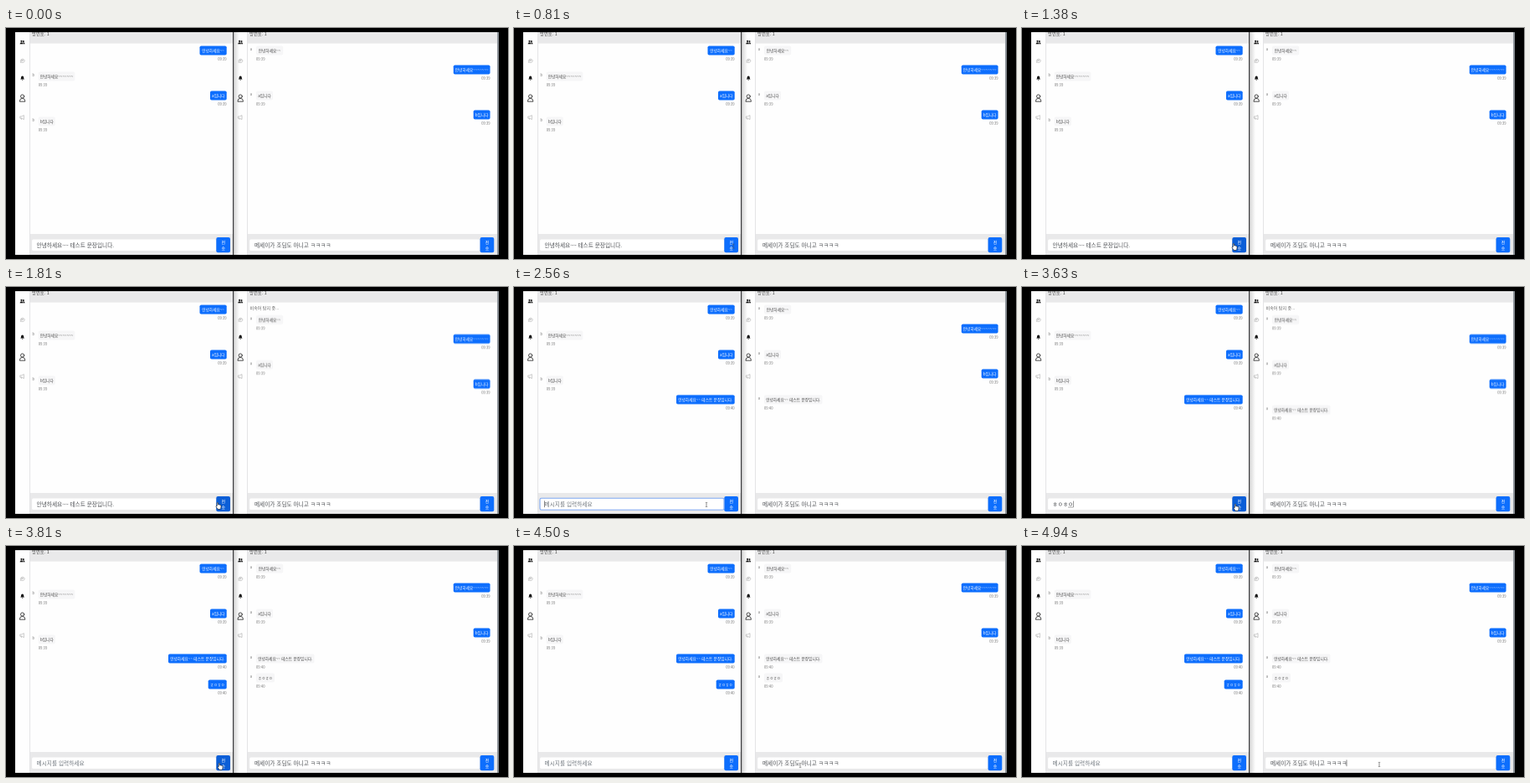
These frames come from a looping animation (600 by 277 pixels, 5000 ms). An HTML page:

```html
<!DOCTYPE html>
<html lang="ko">
<head>
<meta charset="utf-8">
<title>Chat</title>
<style>
html, body { margin: 0; width: 100%; height: 100%; overflow: hidden; background: #000; }
svg { display: block; width: 100vw; height: 100vh; font-family: "Noto Sans CJK KR", "Noto Sans CJK", "Noto Sans", sans-serif; }
.title { font-size: 5.3px; fill: #444; }
.msg { font-size: 4.7px; text-anchor: middle; fill: #444; }
.msg.mine { fill: #fff; }
.time { font-size: 4.2px; fill: #777; }
.name { font-size: 3.8px; fill: #666; }
.note { font-size: 5px; fill: #666; }
.field { font-size: 6.67px; fill: #4c4f53; }
.hint { fill: #70777e; }
.send { font-size: 5px; fill: #fff; text-anchor: middle; }

/* Hard on/off changes */
.draft, .hint, .typed, .focus, .caret, .checking, .shift, .first, .second,
.hover, .arrow, .beam, .hand, .rightCaret, .key { animation: 5s step-end infinite; }
.draft { animation-name: draft; }
.hint { animation-name: hint; }
.typed { animation-name: typed; }
.key { animation-name: key2; }
.key.k3 { animation-name: key3; }
.key.k4 { animation-name: key4; }
.focus { animation-name: focus; }
.caret { animation-name: caret; }
.checking { animation-name: checking; }
.shift { animation-name: shift; }
.first { animation-name: first; }
.second { animation-name: second; }
.hover { animation-name: hover; }
.arrow { animation-name: arrow; }
.beam { animation-name: beam; }
.hand { animation-name: hand; }
.rightCaret { animation-name: rightCaret; }
.pointer { animation: move 5s ease-in-out infinite; }

@keyframes draft { 0% { opacity: 1 } 41.2%, 100% { opacity: 0 } }
@keyframes hint { 0% { opacity: 0 } 41.2% { opacity: 1 } 56.2% { opacity: 0 } 75%, 100% { opacity: 1 } }
@keyframes typed { 0% { opacity: 0 } 56.2% { opacity: 1 } 75%, 100% { opacity: 0 } }
@keyframes key2 { 0% { opacity: 0 } 57.4%, 100% { opacity: 1 } }
@keyframes key3 { 0% { opacity: 0 } 58.8%, 100% { opacity: 1 } }
@keyframes key4 { 0% { opacity: 0 } 60%, 100% { opacity: 1 } }
@keyframes focus { 0% { opacity: 0 } 50% { opacity: 1 } 68.8%, 100% { opacity: 0 } }
@keyframes caret { 0% { opacity: 0 } 50% { opacity: 1 } 56.2%, 100% { opacity: 0 } }
@keyframes checking { 0% { opacity: 0 } 32.6% { opacity: 1 } 41.2% { opacity: 0 } 68.8% { opacity: 1 } 75%, 100% { opacity: 0 } }
@keyframes shift {
  0%, 41.2%, 75%, 100% { transform: none }
  32.6%, 68.8% { transform: translateY(12.3px) }
}
@keyframes first { 0% { opacity: 0 } 41.2%, 100% { opacity: 1 } }
@keyframes second { 0% { opacity: 0 } 75%, 100% { opacity: 1 } }
@keyframes hover { 0%, 44.6%, 86%, 100% { fill: #0d6efd } 16.8%, 64% { fill: #0b5ed7 } }
@keyframes arrow { 0% { opacity: 0 } 8.8% { opacity: 1 } 13.6%, 100% { opacity: 0 } }
@keyframes beam { 0%, 16.8%, 64% { opacity: 0 } 13.6%, 44.6%, 86%, 100% { opacity: 1 } }
@keyframes hand { 0%, 44.6%, 86%, 100% { opacity: 0 } 16.8%, 64% { opacity: 1 } }
@keyframes rightCaret { 0% { opacity: 0 } 96.2%, 100% { opacity: 1 } }
@keyframes move {
  0%, 8.8% { transform: translate(382px, 235px) }
  17.6%, 20% { transform: translate(256px, 263px) }
  27.6%, 43.8% { transform: translate(254px, 262px) }
  50%, 60% { transform: translate(230px, 261px) }
  65%, 85% { transform: translate(256px, 264px) }
  95%, 100% { transform: translate(427px, 262px) }
}
</style>
</head>
<body>
<svg id="stage" viewBox="0 0 600 277" preserveAspectRatio="none"></svg>
<script>
const rect = (x, y, w, h, fill, extra = '') =>
  `<rect x="${x}" y="${y}" width="${w}" height="${h}" fill="${fill}" ${extra}/>`;
const text = (x, y, cls, str, extra = '') =>
  `<text x="${x}" y="${y}" class="${cls}" ${extra}>${str}</text>`;

const sidebar = x => `
  <g transform="translate(${x} 0)" fill="none" stroke-linecap="round" stroke-linejoin="round">
    <g fill="#111">
      <circle cx="-1.1" cy="15.8" r="1.1"/><circle cx="1.3" cy="16" r="1"/>
      <path d="M-3 19.2q0-2 1.9-2t1.9 2zM1.1 19.2q0-1.2-.5-1.9q2.3-.4 2.3 1.9z"/>
      <path d="M-2.4 61.6q.8-.7.8-2.2q0-1.7 1.6-1.9q1.6.2 1.6 1.9q0 1.5.8 2.2zM-.8 62.1h1.6q-.8 1.2-1.6 0z"/>
    </g>
    <path d="M-1.8 41.2l-.5.2.3-1.1a2.4 2.2 0 1 1 1 1zM-1.1 38.5h2.2M-1.1 39.7h1.5" stroke="#aaa" stroke-width=".6"/>
    <circle cy="82" r="2.1" stroke="#222" stroke-width=".8"/>
    <path d="M-3.3 87.8q0-3.5 3.3-3.5t3.3 3.5z" stroke="#222" stroke-width=".8"/>
    <path d="M-2.4 106h1.6l2.6-1.3v5l-2.6-1.5h-1.6zM-1.5 108.3l.4 1.4" stroke="#aaa" stroke-width=".6"/>
  </g>`;

// A bubble is centred on y; edge is the pane's left or right message margin.
const sent = (edge, y, w, str, time) =>
  rect(edge - w, y - 5.5, w, 11, '#0d6efd', 'rx="1.8"') +
  text(edge - w / 2, y + 1.7, 'msg mine', str) +
  text(edge, y + 11.6, 'time', time, 'text-anchor="end"');

const received = (edge, y, w, str, time, name) =>
  text(edge - 7.3, y - .4, 'name', name) +
  rect(edge, y - 5.5, w, 11, '#f6f6f7', 'rx="1.8"') +
  text(edge + w / 2, y + 1.7, 'msg', str) +
  text(edge, y + 11.6, 'time', time);

const group = (cls, body) => `<g class="${cls}">${body}</g>`;

const pane = (x, right, fieldEnd, hoverClass) =>
  rect(x, 5, right - x, 13.5, '#e9e9ea') +
  rect(x, 247, right - x, 25, '#e9e9ea') +
  rect(x - .8, 5, .8, 267, '#dedee0') +
  text(x + 2.3, 8.6, 'title', '방번호: 1') +
  rect(x + 2.3, 253.5, fieldEnd - x - 2.3, 13.6, '#fff', 'rx="1.5"') +
  rect(fieldEnd + .3, 251, 16.7, 18.3, '#0d6efd', `rx="2" class="${hoverClass}"`) +
  text(fieldEnd + 8.7, 258.7, 'send', '전') +
  text(fieldEnd + 8.7, 265.9, 'send', '송');

const hello = '안녕하세요~~', longHello = '안녕하세요~~~~~~~';
const sentence = '안녕하세요~~ 테스트 문장입니다.', short = 'ㅎㅇㅎㅇ';

const left =
  pane(28.8, 271, 251, 'hover') + sidebar(19.6) +
  sent(263.7, 27, 32.2, hello, '09:39') +
  received(38.8, 58, 43.5, longHello, '09:39', 'b') +
  sent(263.7, 81, 19.7, 'a입니다', '09:39') +
  received(38.8, 112, 20, 'b입니다', '09:39', 'b') +
  group('first', sent(263.7, 135, 69.7, sentence, '09:40')) +
  group('second', sent(263.7, 166, 22, short, '09:40')) +
  text(36.6, 262.7, 'field draft', sentence) +
  text(36.6, 262.7, 'field hint', '메시지를 입력하세요') +
  group('typed', [...short].map((c, i) =>
    text(36.6 + i * 6.14, 262.7, 'field' + (i ? ` key k${i + 1}` : ''), c)).join('') +
    rect(55, 263.8, 6, .5, '#555', 'class="key k4"') +
    rect(61, 256.6, .5, 7.6, '#333', 'class="key k4"')) +
  rect(36.2, 256.4, .6, 7.8, '#333', 'class="caret"') +
  rect(31, 253.3, 220, 14, 'none', 'rx="1.8" stroke="#7fa9f3" stroke-width="1.1" class="focus"');

const rightPane =
  pane(288.8, 587, 566.3, '') +
  rect(272, 5, 7, 267, 'url(#shade)') + sidebar(280.2) +
  text(291.6, 27, 'note checking', '비속어 탐지 중...') +
  group('shift',
    received(299, 27, 32.2, hello, '09:39', 'a') +
    sent(578.6, 50, 43.8, longHello, '09:39') +
    received(299, 81, 20, 'a입니다', '09:39', 'a') +
    sent(578.6, 104, 19.9, 'b입니다', '09:39') +
    group('first', received(299, 135, 69.5, sentence, '09:40', 'a')) +
    group('second', received(299, 158, 22, short, '09:40', 'a'))) +
  text(297, 262.7, 'field', '메세이가 조딤도 아니고 ㅋㅋㅋㅋ') +
  rect(387.7, 256.4, .6, 7.8, '#333', 'class="rightCaret"');

const pointer = group('pointer', `
  <path class="arrow" d="M-2-4v8l1.9-1.7 1.2 2.6 1.2-.6-1.2-2.5h2.5z" fill="#fff" stroke="#111" stroke-width=".6"/>
  <path class="beam" d="M-1.2-2.6h.8l.4.4.4-.4h.8M0-2.2v4.4M-1.2 2.6h.8l.4-.4.4.4h.8" fill="none" stroke="#444" stroke-width=".6"/>
  <path class="hand" d="M-1.8.7v-3.9q.7-1.1 1.4 0v2.2q.8-.6 1.2.2.9-.4 1.2.4 1-.2 1 .8v1.6q0 1.9-1.2 2.5h-2.6q-1.2-1.6-2.2-3.2 0-1.3 1.2-.6z" fill="#fff" stroke="#111" stroke-width=".6"/>`);

document.getElementById('stage').innerHTML = `
  <defs>
    <clipPath id="screen"><rect x="11" y="5" width="578" height="267"/></clipPath>
    <linearGradient id="shade">
      <stop stop-color="#777" stop-opacity=".3"/><stop offset="1" stop-color="#777" stop-opacity="0"/>
    </linearGradient>
  </defs>
  ${rect(0, 0, 600, 277, '#000')}
  <g clip-path="url(#screen)">
    ${rect(11, 5, 578, 267, '#fefefe')}
    ${left}${rightPane}
    ${rect(271, 5, 1.2, 267, '#3a3a3c')}
    ${rect(587, 5, 2, 267, '#8f959b')}
    ${pointer}
  </g>`;
</script>
</body>
</html>
```
